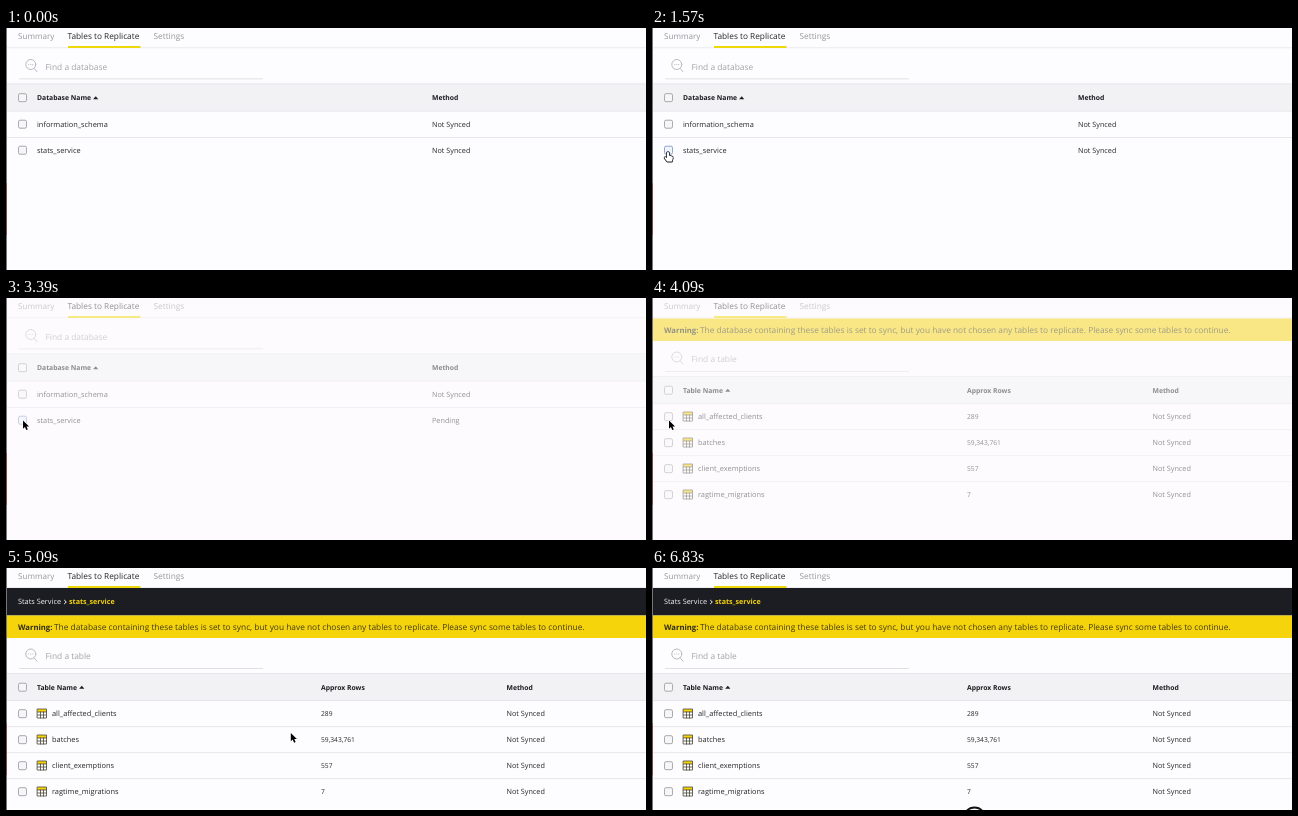
Write an HTML page with a canvas that moves like this. It is 640 px wide and 242 px high and loops after 6.88 s.

```html
<!DOCTYPE html>
<html lang="en">
<head>
<meta charset="utf-8">
<title>Tables to Replicate</title>
<style>
html, body { margin: 0; width: 100%; height: 100%; overflow: hidden; background: #fdfcfe; }
canvas { display: block; width: 640px; height: 242px; }
</style>
</head>
<body>
<canvas id="stage"></canvas>
<script>
const LOOP = 6880;
const BG = '#fdfcfe', INK = '#26262a', YELLOW = '#f6d40c', LINE = '#e3e2e6';
const canvas = document.getElementById('stage');
const ctx = canvas.getContext('2d');
const dpr = window.devicePixelRatio || 1;
canvas.width = 640 * dpr;
canvas.height = 242 * dpr;
ctx.textRendering = 'geometricPrecision';

const clamp = v => Math.max(0, Math.min(1, v));
const progress = (t, a, b) => clamp((t - a) / (b - a));
const ease = p => p * p * (3 - 2 * p);
const mix = (a, b, p) => a + (b - a) * p;

function rect(x, y, w, h, color) {
  ctx.fillStyle = color;
  ctx.fillRect(x, y, w, h);
}

function text(str, x, y, size, color = INK, weight = 400) {
  ctx.font = `${weight} ${size}px "Open Sans", "Noto Sans", sans-serif`;
  ctx.fillStyle = color;
  ctx.fillText(str, x, y);
}

function shape(path, x, y, fill, stroke, width = 1) {
  ctx.save();
  ctx.translate(x, y);
  const p = new Path2D(path);
  ctx.lineJoin = 'round';
  ctx.lineCap = 'round';
  ctx.lineWidth = width;
  if (stroke) { ctx.strokeStyle = stroke; ctx.stroke(p); }
  if (fill) { ctx.fillStyle = fill; ctx.fill(p); }
  ctx.restore();
}

function checkbox(cy, hover) {
  ctx.beginPath();
  ctx.roundRect(12.5, cy - 4, 8, 8, 1.5);
  ctx.fillStyle = hover ? '#eef3fc' : '#f6f5f7';
  ctx.fill();
  ctx.lineWidth = 1;
  ctx.strokeStyle = hover ? '#8fa6cc' : '#aaa9ad';
  ctx.stroke();
}

function tabs() {
  text('Summary', 12, 10.8, 8.1, '#98979b');
  text('Tables to Replicate', 61.5, 10.8, 8.3, INK);
  text('Settings', 147.5, 10.8, 8.3, '#98979b');
  rect(0, 19.5, 640, 0.7, LINE);
  rect(62, 18, 72.5, 2, '#eed908');
}

function search(cy, label) {
  shape('M5 0A5 5 0 1 1 -5 0A5 5 0 1 1 5 0M3.4 4L6.2 7.2', 24.8, cy - 2, null, '#b3b2b6', 0.9);
  for (const dx of [-2, 0, 2]) rect(24.3 + dx, cy - 2.4, 0.9, 0.9, '#b3b2b6');
  text(label, 39.5, cy + 3, 8.4, '#a3a2a6');
  rect(13, cy + 12, 244, 0.8, '#dad9dd');
}

function header(cy, cols, sortX) {
  rect(0, cy - 13.5, 640, 27, '#f2f1f4');
  rect(0, cy - 14, 640, 0.8, LINE);
  rect(0, cy + 13.2, 640, 0.8, LINE);
  checkbox(cy + 0.2);
  for (const [label, x] of cols) text(label, x, cy + 2.7, 6.8, '#1c1c20', 700);
  shape('M-2.6 1.6L0 -1.4L2.6 1.6Z', sortX, cy + 0.2, '#1c1c20');
}

function tableIcon(cy) {
  rect(31.5, cy - 4.5, 9, 9, '#fff');
  rect(31.5, cy - 4.5, 9, 3, YELLOW);
  shape('M0 0H9V9H0ZM0 3H9M0 6H9M3 3V9M6 3V9', 31.5, cy - 4.5, null, '#4a4636', 0.8);
}

function databases(t) {
  search(38.5, 'Find a database');
  header(69.5, [['Database Name', 31], ['Method', 426]], 89.7);
  const rows = [['information_schema', 'Not Synced'],
                ['stats_service', t < 2050 ? 'Not Synced' : 'Pending']];
  rows.forEach(([name, method], i) => {
    const cy = 96.2 + 26 * i;
    if (i) rect(0, cy - 13.2, 640, 0.8, LINE);
    checkbox(cy, i === 1 && t > 1410);
    text(name, 31, cy + 2.5, 7.38);
    text(method, 426, cy + 2.5, 7.25);
  });
}

function tables(open) {
  const dy = open ? 27 : 0;
  if (open) {
    rect(0, 20, 640, 27.5, '#1c1d22');
    text('Stats Service', 12, 36.3, 7.35, '#f4f4f6');
    shape('M0 -1.7L1.8 0L0 1.7', 58.5, 34, null, '#fff', 1);
    text('stats_service', 63, 36.3, 7.15, YELLOW, 700);
  }
  rect(0, 20.5 + dy, 640, 22.5, YELLOW);
  text('Warning:', 12, 35 + dy, 7.7, '#2e2a10', 700);
  text('The database containing these tables is set to sync, but you have not chosen any tables to replicate. Please sync some tables to continue.',
    48, 35 + dy, 8.35, '#423b12');
  search(61 + dy, 'Find a table');
  header(92 + dy, [['Table Name', 31], ['Approx Rows', 315], ['Method', 500.5]], 75.8);
  const rows = [['all_affected_clients', '289'], ['batches', '59,343,761'],
                ['client_exemptions', '557'], ['ragtime_migrations', '7']];
  rows.forEach(([name, count], i) => {
    const cy = 118.5 + dy + 26 * i;
    if (i) rect(0, cy - 13.2, 640, 0.8, LINE);
    checkbox(cy + 0.2);
    tableIcon(cy);
    text(name, 46, cy + 2.5, 7.4);
    text(count, 315, cy + 2.5, 6.7);
    text('Not Synced', 500.5, cy + 2.5, 7.25);
  });
}

const ARROW = 'M0 0V8.2L1.9 6.5L3.3 9.6L4.8 9L3.5 6H6.1Z';
const HAND = 'M-1 .6Q0 -.6 1 .6V3.6L4 4.4Q5 4.8 4.8 6L4 9.6H-.8L-3.4 6.2Q-3.6 4.8 -2.2 5.2L-1 6.2Z';
const BEAM = 'M-1.6 -4.5Q0 -4.5 0 -3.4Q0 -4.5 1.6 -4.5M0 -3.4V3.4M-1.6 4.5Q0 4.5 0 3.4Q0 4.5 1.6 4.5';

const arrow = (x, y) => shape(ARROW, x, y, '#000', '#fff', 1.3);
const beam = (x, y) => shape(BEAM, x, y, null, '#1c1c20', 1);

function cursor(t) {
  if (t < 740) return;
  if (t < 1410) {
    const p = ease(progress(t, 740, 1390));
    arrow(mix(78, 14.5, p), mix(229, 125, p));
  } else if (t < 1990) {
    shape(HAND, 16, 124, '#fff', '#1c1c20', 1.6);
  } else if (t < 4130) {
    arrow(17, 122.5);
  } else if (t < 4740) {
    const p = ease(progress(t, 4130, 4560));
    const x = mix(17, 237.5, p), y = mix(122.5, 57, p);
    if (y < 70) beam(x, y); else arrow(x, y);
  } else if (t < 5390) {
    const p = ease(progress(t, 4740, 5390));
    const x = mix(237.5, 322, p), y = mix(57, 250, p);
    if (y < 70) beam(x, y); else arrow(x, y);
  }
}

function ring(t) {
  if (t < 6500) return;
  ctx.beginPath();
  ctx.arc(322.5, mix(256, 250.5, ease(progress(t, 6500, 6780))), 11, 0, 7);
  ctx.fillStyle = '#fff';
  ctx.fill();
  ctx.lineWidth = 1.8;
  ctx.strokeStyle = '#111';
  ctx.stroke();
}

function draw(t) {
  ctx.setTransform(dpr, 0, 0, dpr, 0, 0);
  rect(0, 0, 640, 242, BG);
  tabs();
  if (t < 3700) databases(t); else tables(t >= 4150);
  // Loading veil over the page
  ctx.globalAlpha = 0.5 * (progress(t, 1990, 2190) - progress(t, 4130, 4330));
  rect(0, 0, 640, 242, BG);
  ctx.globalAlpha = 1;
  rect(0, 0, 1, 242, '#77757a');
  rect(0, 155, 1, 52, '#7a4a48');
  cursor(t);
  ring(t);
}

function tick() {
  draw(performance.now() % LOOP);
  requestAnimationFrame(tick);
}
tick();
</script>
</body>
</html>
```
